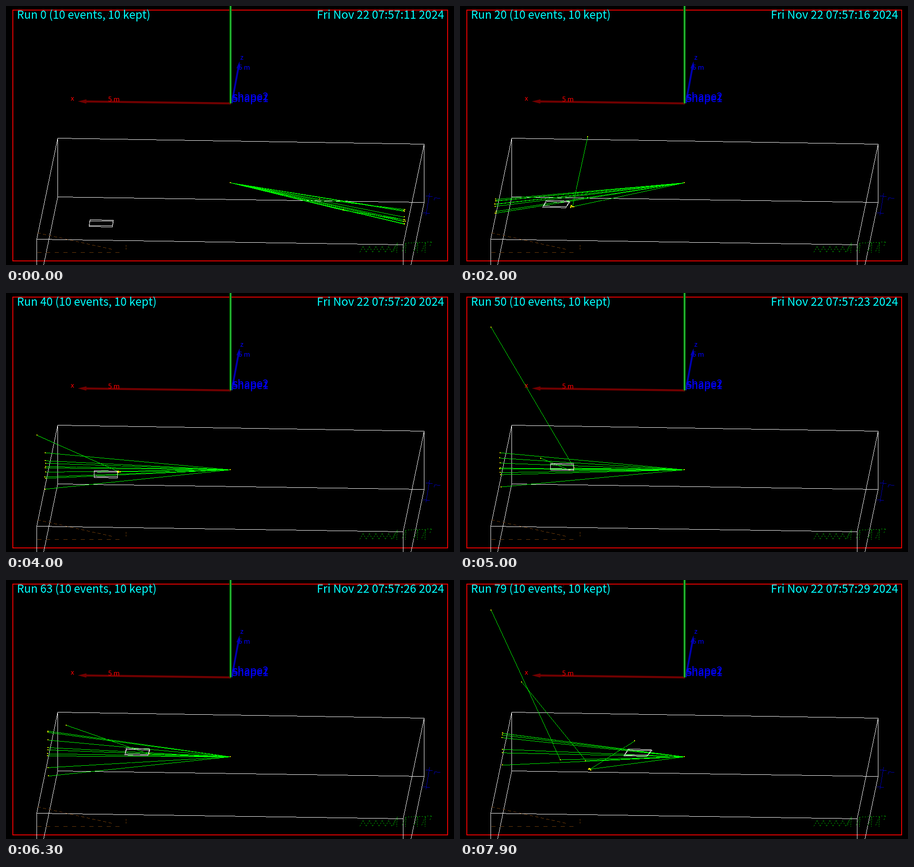
Animation, 983 px wide and 569 px high, one loop 8 s. Source, as a matplotlib script:

```python
import numpy as np
import matplotlib.pyplot as plt
from matplotlib.animation import FuncAnimation

W, H, DPI = 983, 569, 64
FRAMES, STEP = 80, 100
PX = 72 / DPI
SOURCE = (492, 388)
FONT = "Noto Sans CJK JP"
TURN = 53.3  # run at which the detector stops rising and slides right

WHITE, GREEN, YELLOW = (255, 255, 255), (0, 255, 0), (255, 255, 0)
RED, BLUE, BROWN = (235, 0, 0), (0, 0, 180), (110, 60, 10)
SCRAWL, STIPPLE = (0, 160, 0), (0, 150, 150)


def trace(img, pts, color, on=1, off=0):
    """Draw a one-pixel polyline, optionally dashed."""
    for (x0, y0), (x1, y1) in zip(pts, pts[1:]):
        n = int(max(abs(x1 - x0), abs(y1 - y0))) + 1
        keep = np.arange(n) % (on + off) < on
        x = np.rint(np.linspace(x0, x1, n)).astype(int)
        y = np.rint(np.linspace(y0, y1, n)).astype(int)
        keep &= (x >= 0) & (x < W) & (y >= 0) & (y < H)
        img[y[keep], x[keep]] = color


def rect(x0, y0, x1, y1):
    return [(x0, y0), (x1, y0), (x1, y1), (x0, y1), (x0, y0)]


def dot(img, x, y):
    x, y = int(round(x)), int(round(y))
    if x > 0 and y > 0:
        img[y - 1:y + 1, x - 1:x + 1] = YELLOW


def backdrop():
    img = np.zeros((H, W, 3), np.uint8)
    trace(img, rect(14, 8, 969, 560), RED)
    trace(img, rect(15, 9, 968, 559), RED)

    # world volume: back face and the front face leaving the view
    a, b, c, d = (113, 290), (917, 303), (917, 431), (113, 419)
    e, f = (67, 512), (871, 524)
    trace(img, [a, b, c, d, a, e, f, b], WHITE)
    for top, foot in [(d, 82), (c, 888), (e, 67), (f, 871)]:
        trace(img, [top, (foot, H)], WHITE)

    # scale marker
    trace(img, [(929, 411), (921, 459)], BLUE)
    for x, y in [(928, 417), (922, 454)]:
        trace(img, [(x - 7, y), (x + 7, y + 1)], BLUE)
    trace(img, [(939, 426), (940, 421), (952, 422)], BLUE)

    # clipped labels at the floor
    trace(img, [(69, 498), (232, 534)], BROWN, 7, 5)
    trace(img, [(69, 541), (258, 541)], BROWN, 9, 10)
    trace(img, [(263, 525), (263, 534)], BROWN, 4, 2)
    zigzag = [(776 + 7 * i, 528 + 12 * ((i + 1) % 2)) for i in range(12)]
    trace(img, zigzag, SCRAWL, 3, 2)
    for x in (858, 877, 903, 920):
        trace(img, [(x - 8, 538), (x, 520), (x - 1, 541)], SCRAWL, 3, 2)
    trace(img, [(882, 520), (933, 518), (930, 526)], SCRAWL, 3, 3)

    # stippled slants between the title glyphs
    for x in [*range(82, 270, 34), *range(700, 930, 32)]:
        trace(img, [(x, 28), (x + 9, 12)], STIPPLE, 1, 3)
    return img


def detector(n):
    """Centre and outline skew of the box at run n."""
    up = min(n, TURN)
    cx = 208 + 0.006 * up ** 2 + 6.4 * (n - up)
    cy = 477 - 2.25 * up + 0.0068 * up ** 2 + 0.1 * (n - up)
    skew = 5 * max(0, np.sin(np.pi * (n + 2.4) / 31))
    return cx, cy, skew


def draw_box(img, n):
    cx, cy, skew = detector(n)
    for half, shift in [(8, -skew / 5), (5.5, skew / 5)]:
        x = cx + shift
        top = [(x - 25 + skew, cy - half), (x + 26 + skew, cy - half + 1)]
        low = [(x + 26 - skew, cy + half), (x - 25 - skew, cy + half - 1)]
        trace(img, top + low + top[:1], WHITE)


def tracks(n):
    """Ten tracks: most cross to the wall, a few scatter on the way."""
    rng = np.random.default_rng(300 + n)
    sx, sy = SOURCE
    wall = 874 if n == 0 else 92 - 26 * (1 - n / FRAMES) ** 2
    aim = detector(n)[1] - 6
    bent = 2 if n == 0 else rng.integers(1, 4)
    for i in range(10):
        end = (wall + rng.uniform(-2, 2), rng.normal(aim, 26))
        if i >= bent:
            yield [SOURCE, end]
            continue
        t = rng.uniform(0.4, 0.7)
        hit = (sx + t * (wall - sx), sy + t * (end[1] + 12 - sy))
        if n == 0:
            yield [SOURCE, hit, end]
            continue
        angle = rng.uniform(0.15, 0.95) * np.pi
        reach = rng.uniform(60, 560)
        yield [SOURCE, hit, (np.clip(hit[0] + reach * np.cos(angle), 68, 924),
                             hit[1] - reach * np.sin(angle))]


def draw_tracks(img, n):
    rng = np.random.default_rng(700 + n)
    paths = list(tracks(n))
    for path in paths:
        trace(img, path, GREEN)
    for path in paths:
        for x, y in path:
            dot(img, x, y)
    if n and rng.random() < 0.5:
        x, y = paths[0][1]
        for _ in range(8):
            dot(img, rng.normal(x, 2.5), rng.normal(y, 2))


fig = plt.figure(figsize=(W / DPI, H / DPI), dpi=DPI, facecolor="black")
ax = fig.add_axes([0, 0, 1, 1])
ax.axis("off")
base = backdrop()
screen = ax.imshow(base, extent=(-0.5, W - 0.5, H - 0.5, -0.5),
                   interpolation="nearest", aspect="auto")


def arrow(tail, tip, color, width, head):
    tail, tip = np.array(tail, float), np.array(tip, float)
    along = (tip - tail) / np.hypot(*(tip - tail))
    side = np.array([-along[1], along[0]])
    neck = tip - along * head
    w, h = side * width / 2, side * head / 4
    pts = [tail + w, neck + w, neck + h, tip, neck - h, neck - w, tail - w]
    ax.fill(*zip(*pts), color=color, lw=0, zorder=3)


def label(x, y, s, color, size, **kw):
    return ax.text(x, y, s, color=color, fontsize=size * PX, family=FONT,
                   va="baseline", zorder=6, **kw)


arrow((493, 213.5), (157, 209), "#700000", 4.5, 19)
arrow((495, 213), (512, 121), "#0000b0", 4, 16)
ax.fill([489.5, 494.5, 494.5, 489.5], [-1, -1, 214, 214], color="#006e00", lw=0, zorder=4)
ax.fill([491.5, 493.5, 493.5, 491.5], [-1, -1, 214, 214], color="#32c846", lw=0, zorder=5)
label(141, 208, "x", "red", 15)
label(224, 209, "5 m", "red", 15)
label(513, 117, "z", "blue", 15)
label(509, 139, "5 m", "blue", 15)
label(497, 207, "shape2", "blue", 23.5)
label(494, 211, "Shape1", "blue", 23.5)

run = label(24, 28, "", "cyan", 24.6)
clock = label(961, 28, "", "cyan", 24.95, ha="right")
ax.set_xlim(-0.5, W - 0.5)
ax.set_ylim(H - 0.5, -0.5)


def draw(n):
    img = base.copy()
    draw_tracks(img, n)
    draw_box(img, n)
    screen.set_data(img)
    run.set_text(f"Run {n} (10 events, 10 kept)")
    clock.set_text(f"Fri Nov 22 07:57:{int(11.4 + 0.235 * n)} 2024")
    return screen, run, clock


anim = FuncAnimation(fig, draw, frames=FRAMES, interval=STEP, repeat=True, repeat_delay=0)
plt.show()
```
